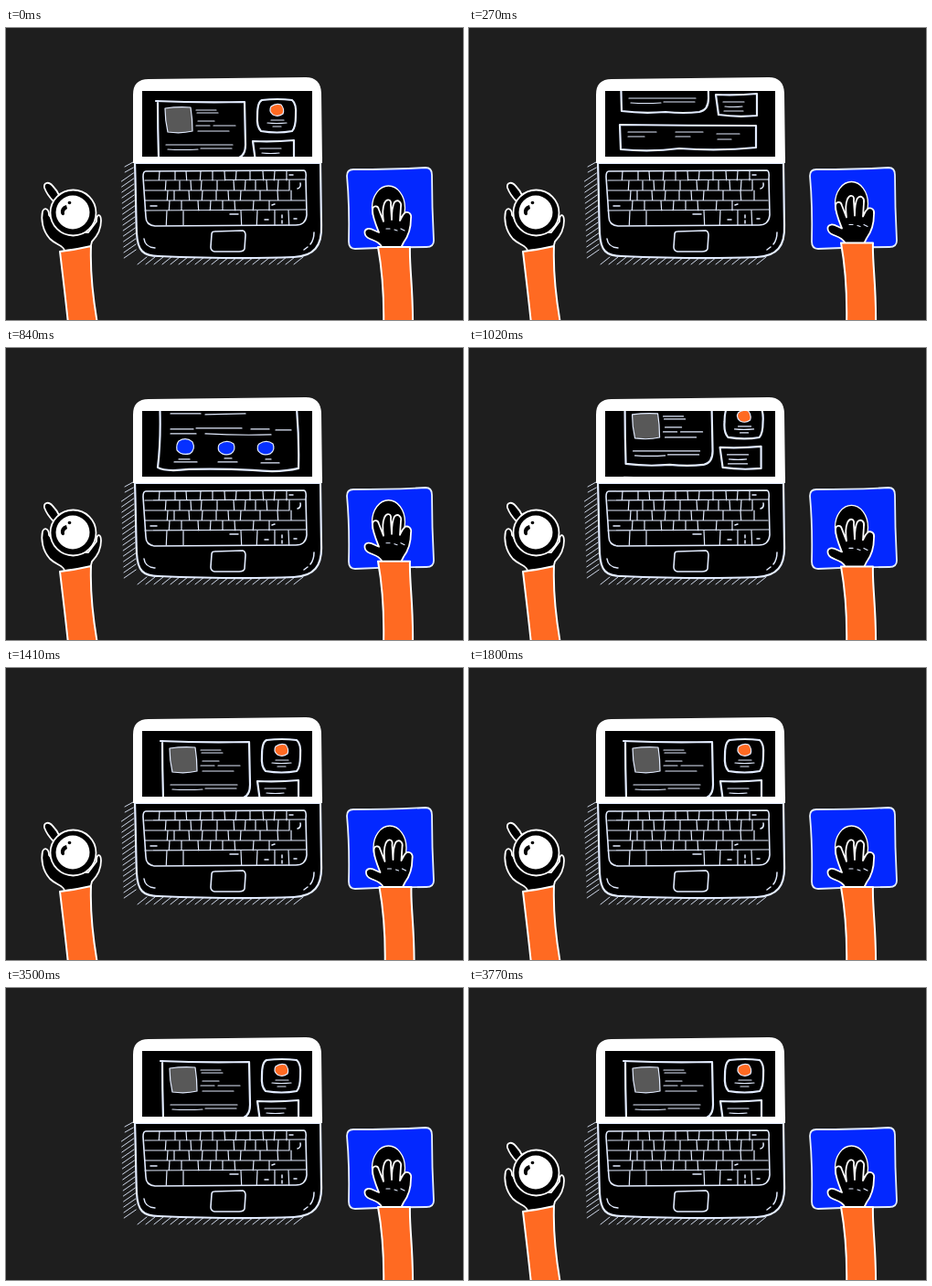
Write an HTML page that moves like this. It is 500 px wide and 320 px high and loops after 4.77 s.

```html
<!DOCTYPE html>
<html>
<head>
<meta charset="utf-8">
<style>
html, body { margin: 0; width: 100%; height: 100%; overflow: hidden; background: #1e1e1e; }
svg { display: block; width: 500px; height: 320px; }
.ink { fill: #000; stroke: #fff; stroke-width: 1.8; }
.card { fill: #000; stroke: #e3ecff; stroke-width: 2.2; }
.thin { fill: none; stroke: #e3ecff; stroke-width: 1.2; }
.sleeve { fill: #ff6a22; stroke: #fff; stroke-width: 2; }
.blue { fill: #0630ff; stroke: #e3ecff; stroke-width: 1.2; }
</style>
</head>
<body>
<svg viewBox="0 0 500 320" stroke-linecap="round" stroke-linejoin="round">
  <clipPath id="screen"><path d="M149 69H335V141H149Z"/></clipPath>

  <!-- laptop -->
  <path id="hatch" class="thin" style="stroke-width:.9"/>
  <path fill="#fff" d="M139 148V73Q139 56 156 56L328 54Q344 54 345 71L346 148Z"/>
  <path d="M149 69H335V141H149Z"/>
  <path class="card" d="M141 148C142 176 142 202 143 225C144 244 150 250 167 250C215 252 265 253 315 251C337 250 346 239 345 216L344 148Z"/>
  <path fill="#fff" d="M139 141H346V148H139Z"/>
  <path id="keys" class="thin"/>
  <path class="thin" style="stroke-width:1.6" d="M153 157L326 156Q329 157 328 165L329 205Q328 216 317 216L163 217Q153 216 153 207L150 163Q150 157 153 157ZM228 223L259 222Q262 223 262 227L261 242Q260 245 255 245L228 245Q224 244 224 240L225 226Q225 223 228 223Z"/>
  <path class="thin" style="stroke-width:1.5" d="M151 231Q152 240 163 241M326 243L330 240M333 237Q337 232 337 224M310 161h4M158 195h7M245 204h9M283 210h4M302 205v3M302 211v3M315 209h3M291 194l3 -1M322 170Q323 175 319 176"/>

  <!-- page on the screen -->
  <g clip-path="url(#screen)">
    <g id="page">
      <path class="card" d="M164 80Q210 82 261 81L262 128Q262 141 252 143Q235 145 215 143Q190 145 167 142Q166 110 166 80"/>
      <path class="thin" fill="none" style="fill:#585858" d="M174 88Q188 86 202 87Q204 99 204 113Q192 116 177 114Q174 101 174 88Z"/>
      <path class="thin" d="M208 90h22M209 93h23M210 102h18M208 107h15M227 107h24M210 113h34M175 128h73M177 133q16 1 33 0M213 132h34"/>
      <path class="card" d="M280 79Q297 77 313 79Q318 83 317 96Q317 109 313 113Q297 116 279 113Q274 108 275 96Q275 81 280 79Z"/>
      <path class="thin" style="fill:#ff6a22" d="M290 86Q295 82 301 84Q305 89 303 94Q298 98 292 95Q287 91 290 86Z"/>
      <path class="thin" d="M290 101h14M286 104q10 1 21 0M292 108h9"/>
      <path class="card" d="M270 124Q293 125 315 123L315 147Q293 149 273 146Z"/>
      <path class="thin" d="M278 132h23M280 137q10 1 19 0M279 142h21"/>
      <path class="card" d="M165 157Q240 158 314 158L314 182Q275 186 230 183Q200 187 166 184Z"/>
      <path class="thin" d="M174 165h31M174 170h18M226 165h30M226 170h16M271 167h25M272 173h15"/>
      <g transform="translate(-.9 141)">
        <path class="card" d="M168 56Q170 98 166 131Q174 136 200 133Q235 132 270 134Q300 137 320 132Q321 95 317 56Z"/>
        <path class="thin" d="M180 72h33M218 73l44 -1M180 89h25M208 88h50M268 89h20M295 90h17M180 94h28M218 94q35 2 72 1M189 122h12M184 125h25M239 121h8M232 125h21M284 122h6M279 126h20"/>
        <path class="blue" d="M189 102Q197 97 204 103Q208 111 201 116Q191 118 187 112Q186 106 189 102Z"/>
        <path id="blob" class="blue" d="M234 105Q242 100 249 105Q252 112 246 116Q238 119 233 113Q231 108 234 105Z"/>
        <use href="#blob" x="43"/>
      </g>
    </g>
  </g>

  <!-- hand with cup -->
  <g id="left">
    <path class="ink" d="M64 244C63 238 55 238 48 231C40 222 38 210 40 201C42 196 47 198 47 205L60 222L90 224L99 212C99 203 104 203 104 211C104 222 98 230 94 234L92 242Z"/>
    <path class="ink" d="M52 190Q45 183 42 175C41 169 47 168 51 173Q56 178 59 185Z"/>
    <circle class="ink" cx="73.5" cy="202.5" r="25"/>
    <circle cx="73" cy="202" r="18.5" fill="#fff"/>
    <circle cx="69.5" cy="191.5" r="1.8"/>
    <path d="M66 194Q59 196 60 203Q62 207 64 204Q63 200 67 198Z"/>
    <path class="sleeve" d="M59 245Q76 243 93 239C92 265 95 295 100 324H68C65 295 62 270 59 245Z"/>
  </g>

  <!-- hand with mouse -->
  <path d="M380 155Q422 155 459 153Q466 153 466 161Q466 196 468 233Q468 240 460 240Q420 240 382 242Q375 242 375 234Q376 195 373 162Q373 155 380 155Z" fill="#0328ff" stroke="#e3ecff" stroke-width="1.8"/>
  <g id="right">
    <ellipse class="ink" style="stroke-width:1.3" cx="418.5" cy="197" rx="18" ry="24"/>
    <path class="ink" d="M412 241C409 235 405 234 398 231C391 228 391 221 396 220C400 219 404 223 408 224C404 214 401 207 401 200C401 194 407 194 408 199L413 212C412 205 412 197 414 192C417 186 422 188 421 194L422 210C422 203 422 196 425 191C429 187 433 191 432 196L431 211C433 207 434 204 437 202C441 201 444 204 443 209C443 219 441 227 435 235L432 241Z"/>
    <path class="thin" d="M416 220h4M425 221l3 1M432 220l4 2"/>
    <path class="sleeve" d="M407 240H442C441 260 446 290 445 332H413C414 295 411 262 407 240Z"/>
  </g>
</svg>
<script>
const $ = id => document.getElementById(id);

// keyboard rows: top, bottom, right end, separators
const rows = [
  [157, 167, 328, [168, 185, 197, 213, 226, 239, 252, 267, 281, 294, 307]],
  [167, 178, 310, [175, 190, 202, 214, 231, 249, 262, 273, 285, 298]],
  [178, 189, 312, [177, 184, 200, 215, 230, 243, 257, 278, 297]],
  [189, 200, 328, [179, 192, 210, 224, 237, 250, 271, 288]],
  [200, 216, 0, [176, 194, 257, 275, 294, 309]]
];
$('keys').setAttribute('d', rows.map(([top, bottom, end, xs]) =>
  xs.map((x, i) => `M${x} ${top}L${x + (i % 3 - 1) * .7} ${bottom}`).join('') +
  (end ? `M152 ${bottom}L${end} ${bottom + (end > 320 ? -1 : 0)}` : '')
).join('') + 'M310 167V178M312 178V189H327');

let hatch = '';
for (let i = 0; i < 17; i++) {
  const y = 147 + i * 6, x = 139 + i * .2;
  hatch += `M${x} ${y}L${x - (i < 2 ? 9 : 13)} ${y + (i < 2 ? 5 : 9)}`;
}
for (let x = 154; x < 332; x += 9) hatch += `M${x} 251L${x - 10} 259`;
$('hatch').setAttribute('d', hatch);

// eased value between [time, value] keys
function at(t, keys) {
  if (t <= keys[0][0]) return keys[0][1];
  for (let i = 1; i < keys.length; i++) {
    const [a, from] = keys[i - 1], [b, to] = keys[i];
    if (t <= b) {
      const p = (t - a) / (b - a);
      return from + (to - from) * p * p * (3 - 2 * p);
    }
  }
  return keys[keys.length - 1][1];
}

const move = (id, x, y) => $(id).setAttribute('transform', `translate(${x} ${y})`);

function draw(now) {
  const loop = now % 4770;
  const t = loop - loop % 10;
  move('page', at(t, [[750, 0], [1080, 5]]), at(t, [[0, 0], [750, -172.6], [1080, 0]]));
  move('right',
    at(t, [[1380, 0], [1440, 3], [1640, -6], [1800, 0]]),
    at(t, [[0, 0], [630, -11.4], [1080, 0]]));
  move('left', 0, at(t, [[2170, 0], [2470, 156], [3470, 156], [3770, 0]]));
}

const start = performance.now();
function tick() {
  draw(performance.now() - start);
  requestAnimationFrame(tick);
}
tick();
</script>
</body>
</html>
```
